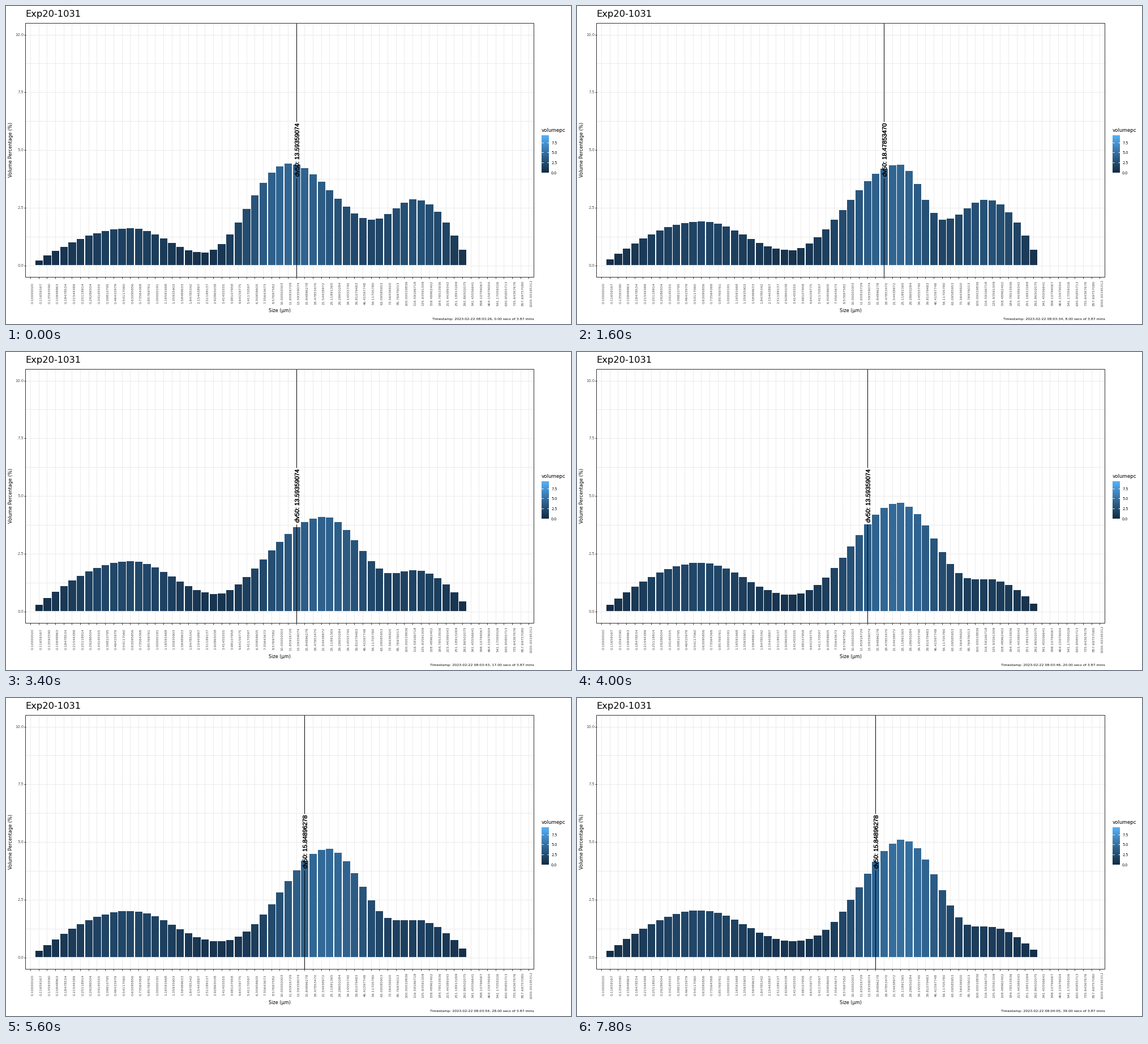
Write a matplotlib script that moves like this. It is 998 px wide and 561 px high and loops after 8000 ms.

```python
import numpy as np
import matplotlib.pyplot as plt
from matplotlib.animation import FuncAnimation
from matplotlib.colors import LinearSegmentedColormap
from matplotlib.patches import Rectangle
from matplotlib.patheffects import withStroke

W, H = 998, 561
LEFT, RIGHT, TOP, BOTTOM = 35, 933, 30, 478
ZERO, UNIT = 457, 40.69         # y of 0 % and pixels per percent
X0, STEP = 43.6, 14.673         # first size class and class spacing
MAX_VOLUME = 9.4
GRID, DARK, GREY = "#EBEBEB", "#333333", "#4D4D4D"
N_FRAMES, INTERVAL = 40, 200

# Key moments of the measurement: peak heights in pixels, places in classes
SECONDS = [0, 4, 11, 17, 23, 33, 39]
FINE = [65, 81, 74, 88, 82.5, 80.5, 82.5]
MIDDLE = [179, 115, 224, 166, 216, 166, 207]
MIDDLE_X = [31.1, 35.5, 36, 35.4, 36.1, 35.4, 36.3]
COARSE = [116, 166, 78, 72, 41, 90, 54]
MEDIAN = [32, 35, 34, 32, 33, 33, 33]
FINE_X, COARSE_X, END_X = 12, 46.3, 53

CLASSES = np.arange(61)
BARS = np.arange(1, END_X)
SIZES = [f"{float(np.float32(10 ** (k / 15 - 1) * 1.00000196)):.8f}"
         for k in CLASSES]
BLUES = LinearSegmentedColormap.from_list(
    "blues", ["#132B43", "#336A98", "#56B1F7"])


def class_x(k):
    return X0 + STEP * k


def volume_y(v):
    return ZERO - UNIT * v


def swing(x0, y0, x1, y1, power=1):
    """Sine ease over the bars from one turning point to the next."""
    t = np.clip((BARS - x0) / (x1 - x0), 0, 1) ** power
    return y0 + (y1 - y0) * (1 - np.cos(np.pi * t)) / 2


def bar_heights(second):
    """Three humps joined by a valley and a dip."""
    fine, mid, mid_x, coarse = (
        np.interp(second, SECONDS, track)
        for track in (FINE, MIDDLE, MIDDLE_X, COARSE))
    valley, valley_x = 0.34 * fine, 9 + 0.38 * mid_x
    dip, dip_x = min(coarse, 45 + 0.3 * coarse), 38 + 12.9 * np.exp(-coarse / 84)
    sharpness = max(0.9, mid / 100 - 0.76)
    rise = fine * np.sin(np.pi / 2 * BARS / FINE_X)
    fall = coarse * np.cos(np.pi / 2 * (BARS - COARSE_X) / (END_X - COARSE_X))
    return np.select(
        [BARS < x for x in (FINE_X, valley_x, mid_x, dip_x, COARSE_X)],
        [rise,
         swing(FINE_X, fine, valley_x, valley),
         swing(valley_x, valley, mid_x, mid, sharpness),
         swing(mid_x, mid, dip_x, dip),
         swing(dip_x, dip, COARSE_X, coarse)],
        fall)


# At 72 dpi one point is one pixel
fig = plt.figure(figsize=(W / 72, H / 72), dpi=72, facecolor="white")
ax = fig.add_axes([0, 0, 1, 1])
ax.axis("off")


def label(x, y, text, size, color="black", ha="center", va="center", **kw):
    kw.setdefault("family", "DejaVu Sans")
    return ax.text(x, y, text, fontsize=size, color=color, ha=ha, va=va, **kw)


def line(x0, y0, x1, y1, color, z):
    return ax.plot([x0, x1], [y0, y1], color=color, lw=1, zorder=z,
                   solid_capstyle="butt")[0]


# Grid, ticks and tick labels
for k in CLASSES:
    x = int(class_x(k)) + 0.5
    line(x, TOP, x, BOTTOM, GRID, 1)
    line(x, BOTTOM, x, BOTTOM + 3, DARK, 4)
    label(class_x(k) + 4, 507, SIZES[k], 6.15, GREY, rotation=90)
for n in range(9):
    y = int(volume_y(1.25 * n)) + 0.5
    line(LEFT, y, RIGHT, y, GRID, 1)
    if n % 2 == 0:
        line(LEFT - 3, y, LEFT, y, DARK, 4)
        label(31, y + 0.5, f"{1.25 * n:.1f}", 6.7, GREY, ha="right")

ax.add_patch(Rectangle((LEFT - 0.5, TOP - 0.5), RIGHT - LEFT, BOTTOM - TOP,
                       fill=False, ec=DARK, lw=1, zorder=5))

# Titles
label(34, 19, "Exp20-1031", 16.3, ha="left", va="baseline")
label(9, 253, "Volume Percentage (%)", 8.25, rotation=90)
label(483, 538, "Size (µm)", 8.1)
caption = label(932.5, 554, "", 6.28, ha="right", va="baseline")

# Legend
label(946, 221.5, "volumepc", 8.7, ha="left", va="baseline")
ax.imshow(np.linspace(1, 0, 66)[:, None], cmap=BLUES, aspect="auto",
          extent=(946, 959, 294, 228), zorder=2)
for n in range(4):
    y = 293.5 - 17.6 * n
    line(946, y, 948.6, y, "white", 3)
    line(956.4, y, 959, y, "white", 3)
    label(963, y + 1, f"{2.5 * n:.1f}", 6.5, ha="left")

# Moving parts
bars = [ax.add_patch(Rectangle((class_x(k) - 0.45 * STEP, ZERO), 0.9 * STEP, 0,
                               lw=0, zorder=3)) for k in BARS]
upper = line(0, TOP, 0, 204, "black", 4)
lower = line(0, 304, 0, BOTTOM, "black", 4)
marker = label(0, 254, "", 11, rotation=90, family="Liberation Sans", zorder=6,
               path_effects=[withStroke(linewidth=0.3, foreground="black")])

ax.set_xlim(0, W)
ax.set_ylim(H, 0)


def update(second):
    for bar, h in zip(bars, bar_heights(second)):
        bar.set_y(ZERO - h)
        bar.set_height(h)
        bar.set_facecolor(BLUES(h / UNIT / MAX_VOLUME))

    mid = round(np.interp(second, SECONDS, MEDIAN))
    x = int(class_x(mid)) + 0.5
    upper.set_xdata([x, x])
    lower.set_xdata([x, x])
    marker.set_x(x + 1.2)
    marker.set_text(f"dv50: {SIZES[mid]}")

    minute, sec = divmod(3 * 60 + 26 + second, 60)
    caption.set_text(f"Timestamp: 2023-02-22 08:{minute:02d}:{sec:02d}, "
                     f"{second:.2f} secs of 3.87 mins")
    return [*bars, upper, lower, marker, caption]


anim = FuncAnimation(fig, update, frames=N_FRAMES, interval=INTERVAL,
                     repeat=True, repeat_delay=0)
plt.show()
```
